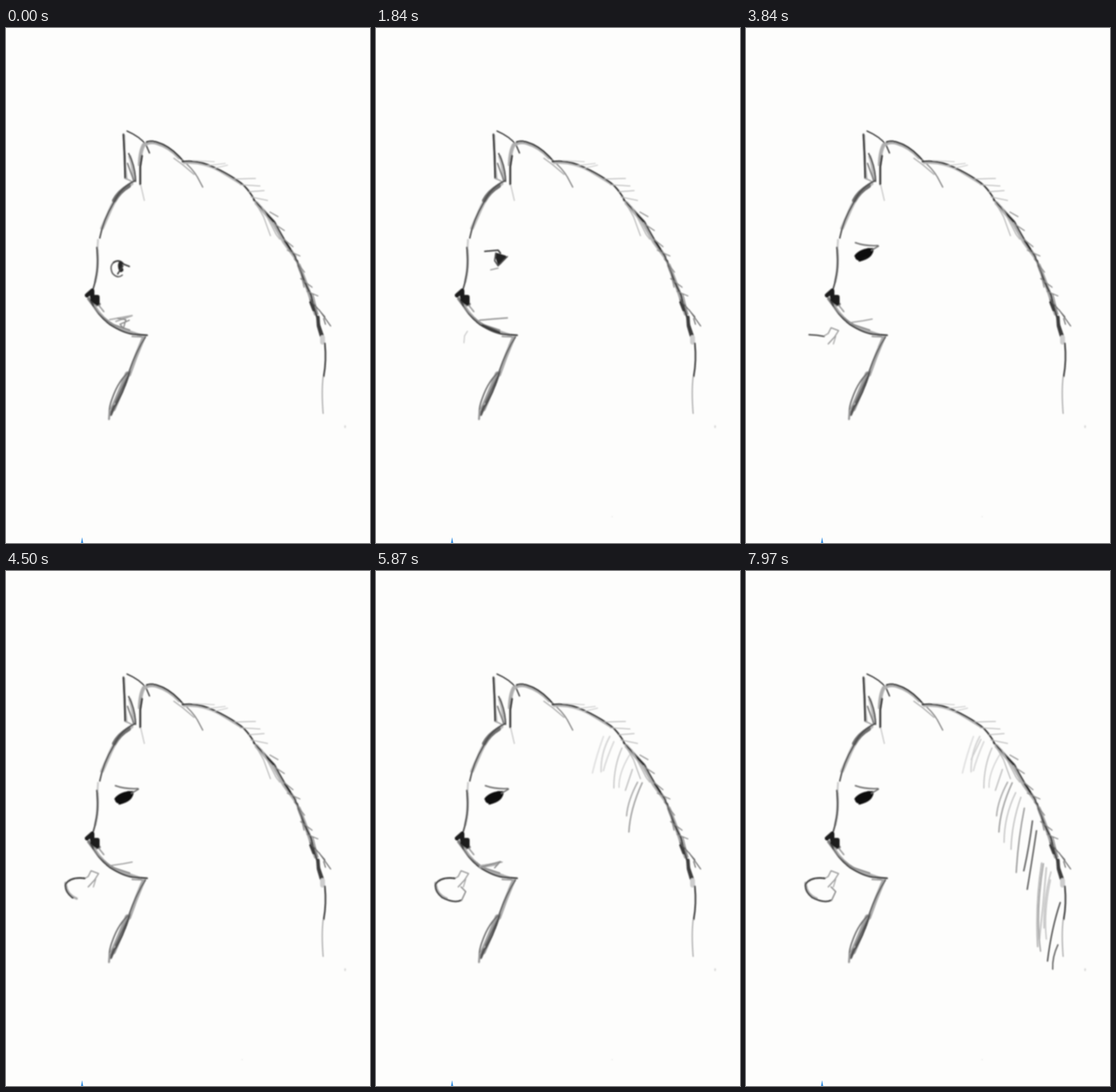
Animation of 629 by 890 pixels, one loop 8 s. Source, as an HTML page:

```html
<!DOCTYPE html>
<html lang="en">
<head>
<meta charset="utf-8">
<title>Pencil cat</title>
<style>
  html, body { margin: 0; width: 100%; height: 100%; overflow: hidden; background: #fdfdfc; }
  svg { display: block; width: 100vw; height: 100vh; }
  path { fill: none; stroke-linecap: round; stroke-linejoin: round; }
</style>
</head>
<body>
<svg viewBox="0 0 629 890">
  <defs><filter id="soft" filterUnits="userSpaceOnUse" x="0" y="0" width="629" height="890"><feGaussianBlur stdDeviation="0.85"/></filter></defs>
  <g id="art" filter="url(#soft)"></g>
  <path d="M131.5 880L129.5 890H133.5Z" style="fill: #3d93e2"/>
</svg>
<script>
const LOOP = 8000;
const BLEED = 0.5;
const art = document.getElementById('art');

// Rows: grey level, line width, path, then optionally [draw from, draw to, rub out from, rub out to] in ms.
const ears = [
  [190, 4, 'M204 186Q204 230 208 260'],
  [55, 2.8, 'M203 184L205 222L206 259'],
  [50, 1.6, 'M209 178Q232 188 242 202L248 216'],
  [185, 5, 'M214 222Q220 240 221 262'],
  [60, 1.8, 'M212 217Q223 238 224 265'],
  [120, 2, 'M210 234L221 264'],
  [175, 6, 'M238 202Q232 212 231 236'],
  [55, 2.8, 'M235 221L232 240L232 270'],
  [195, 1.3, 'M233 272L236 285L239 298'],
  [160, 1.5, 'M207 260L219 266'],
  [175, 5, 'M238 203Q247 196 260 199Q283 206 299 224'],
  [45, 2.2, 'M243 197Q250 194 260 197Q281 203 299 222L308 232'],
  [165, 1.4, 'M290 225L305 236L325 253'],
  [120, 1.4, 'M304 228Q322 242 331 258L340 275']
];

const face = [
  [185, 6, 'M217 269Q196 281 182 310L166 346'],
  [110, 7, 'M212 273Q195 283 187 298'],
  [80, 2.2, 'M223 264Q198 275 186 302Q168 332 162 363'],
  [205, 3, 'M159 366L158 382'],
  [185, 4, 'M158 384Q160 416 154 439'],
  [75, 2.2, 'M157 379Q160 410 156 428Q154 441 150 453'],
  [130, 5, 'M143 468L152 480L161 477'],
  [28, 7, 'M140 462L149 454L149 465L158 465L158 476L149 470'],
  [150, 2, 'M161 480L169 490'],
  [175, 4.5, 'M153 481Q169 507 194 518L232 531'],
  [65, 2.3, 'M147 473Q158 496 179 512Q203 527 219 529L244 531'],
  [130, 1.4, 'M151 482Q167 502 187 513L214 522'],
  [150, 2, 'M218 533L240 534']
];

const neck = [
  [170, 6, 'M237 537Q224 567 213 599'],
  [95, 2, 'M241 534Q225 558 213 593L206 618'],
  [160, 9, 'M210 598Q199 626 185 658'],
  [70, 2.4, 'M214 593Q204 630 180 668'],
  [110, 2, 'M214 593Q195 608 184 639Q176 660 180 668'],
  [90, 1.6, 'M211 600L189 647'],
  [85, 4.5, 'M187 654L181 668'],
  [150, 3, 'M179 662L178 676']
];

const back = [
  [185, 4, 'M308 233Q339 230 370 247L406 269'],
  [55, 2.4, 'M305 231Q331 227 360 241Q394 257 412 273Q424 286 430 299'],
  [180, 6, 'M433 303L459 332L480 369L499 395'],
  [65, 2.3, 'M428 297Q448 318 464 335Q480 366 499 394Q510 423 520 449'],
  [165, 6, 'M506 410L516 436L525 461L535 494'],
  [60, 2.6, 'M503 402Q514 438 527 461Q534 493 548 532'],
  [60, 5.5, 'M527 474L532 487M539 500L540 515L545 532'],
  [45, 3.4, 'M451 322L462 334M482 368L491 382'],
  [205, 8, 'M547 535L547 543'],
  [65, 2.4, 'M551 545Q554 575 549 602'],
  [170, 1.6, 'M548 603Q545 628 548 666']
];

const tufts = [
  [200, 1.1, 'M323 229L360 231M346 238L379 234M358 243L383 237'],
  [180, 1.2, 'M394 261L431 260M405 271L439 273M420 283L446 281M423 292L452 298'],
  [175, 1.2, 'M430 300L445 326L457 359M442 309L467 357L473 365'],
  [135, 1.2, 'M456 318L470 326M466 340L481 350M480 365L496 378M486 384L508 394M498 399L516 422'],
  [130, 1.2, 'M507 413L515 448M509 433L529 448M520 455L539 463M530 459L539 495'],
  [100, 1.3, 'M525 469L551 499M541 487L561 515M549 502L552 512']
];

const eyes = [
  [85, 1.8, 'M190 403Q177 409 184 424Q193 434 201 427', [0, 0, 180, 520]],
  [65, 2.4, 'M186 405Q196 399 203 408L213 412', [0, 0, 310, 640]],
  [40, 7, 'M198 407Q196 412 199 418', [0, 0, 440, 720]],
  [65, 2, 'M202 411L193 425', [0, 0, 500, 760]],

  [55, 2.2, 'M188 386L211 384L215 389', [840, 1030, 1880, 2030]],
  [35, 6, 'M209 392L222 396L213 406L210 397L218 397', [1050, 1450, 1930, 2180]],
  [75, 1.8, 'M207 389L205 402L211 411L227 395', [1300, 1590, 1980, 2210]],
  [155, 1.4, 'M198 418L211 415', [1600, 1680, 2080, 2200]],

  [75, 2, 'M191 376Q211 382 230 382', [2220, 2360, 2800, 2960]],
  [50, 9, 'M194 395L218 388L200 402L216 394', [2360, 2620, 2890, 3100]],
  [65, 2, 'M188 393L211 388L229 386L211 402L191 406', [2460, 2680, 2940, 3110]],

  [115, 2, 'M189 371Q205 377 228 376', [3100, 3240]],
  [10, 13, 'M195 395L212 387', [3270, 3530]],
  [15, 3, 'M189 394Q198 382 219 382Q218 397 196 402', [3340, 3620]],
  [110, 1.7, 'M217 384L229 377', [3610, 3700]]
];

const mouth = [
  [170, 2, 'M179 504L218 497L190 507', [0, 0, 700, 1060]],
  [135, 1.6, 'M193 502L207 504L203 519L197 512L213 505', [0, 0, 780, 1120]],
  [150, 2, 'M179 505L201 503L227 501', [1390, 1550, 2230, 2480]],
  [60, 3.6, 'M184 514L213 526', [1600, 1780, 2360, 2520]],
  [200, 3, 'M196 506L222 506', [2520, 2650, 2980, 3100]],
  [155, 1.7, 'M181 509L202 506L218 503', [3180, 3370, 7000, 7360]],
  [175, 5, 'M181 511L209 506', [4630, 4820, 6980, 7340]],
  [135, 1.6, 'M181 512L215 502L205 513', [4760, 5000, 7060, 7480]]
];

const paw = [
  [200, 1.4, 'M158 524L153 532L152 544', [1700, 1830, 3340, 3460]],
  [75, 2, 'M109 530L123 531L135 533', [3460, 3610, 3930, 4080]],
  [150, 1.5, 'M135 532L142 528L147 518L160 523L153 534L142 546', [3590, 3830]],
  [165, 1.4, 'M155 533L151 546', [3770, 3830]],
  [175, 4, 'M103 539Q104 559 122 566', [4220, 4480]],
  [65, 2.4, 'M136 531Q112 528 103 541Q101 553 114 564Q135 575 147 569', [4150, 4680]],
  [135, 1.7, 'M147 546L155 554L148 569', [4650, 4830]]
];

const mane = [
  [222, 2, 'M393 286Q381 319 374 349'],
  [212, 2.2, 'M404 286Q388 315 389 347'],
  [215, 2, 'M411 295Q398 325 393 345'],
  [195, 1.6, 'M425 306Q411 337 411 375'],
  [210, 1.6, 'M438 318Q419 350 420 374'],
  [190, 1.8, 'M443 343L431 379'],
  [165, 1.8, 'M452 365Q435 397 433 423'],
  [155, 1.9, 'M460 366Q439 412 437 451'],
  [195, 1.7, 'M466 383Q446 424 446 469'],
  [190, 1.7, 'M475 391Q459 437 458 481'],
  [150, 1.9, 'M481 410Q470 465 467 521'],
  [95, 2.1, 'M495 432Q489 479 480 518'],
  [90, 2, 'M502 449Q494 502 486 550'],
  [185, 2.4, 'M511 505Q500 574 504 649'],
  [200, 2.4, 'M519 513L513 580L507 636'],
  [195, 1.8, 'M526 534Q514 590 519 636'],
  [75, 1.9, 'M543 573Q528 617 521 674'],
  [90, 1.8, 'M539 646Q529 667 530 688']
].map((row, i) => [...row, [5250 + i * 78, 5320 + i * 78]]);

const finish = [
  [165, 1.8, 'M514 506Q500 592 509 657', [6780, 6960]],
  [195, 1.8, 'M527 520Q514 565 515 617', [7510, 7720]],
  [205, 1.6, 'M406 291L389 326', [7730, 7900]],
  [215, 2.4, 'M586 688L586 690'],
  [235, 1.5, 'M408 844L408 845', [1700, 1710]]
];

function addStroke([grey, width, d, timing]) {
  const path = document.createElementNS(art.namespaceURI, 'path');
  path.setAttribute('d', d);
  path.setAttribute('stroke', `rgb(${grey},${grey},${grey})`);
  path.setAttribute('stroke-width', width + BLEED);
  if (timing) path.setAttribute('pathLength', 1);
  art.append(path);
  return { path, timing };
}

const moving = [ears, face, neck, back, tufts, eyes, mouth, paw, mane, finish]
  .flat().map(addStroke).filter(stroke => stroke.timing);

const progress = (t, from, to) =>
  to <= from ? +(t >= from) : Math.min(1, Math.max(0, (t - from) / (to - from)));

function render(t) {
  for (const { path, timing: [from, to, rubFrom = Infinity, rubTo = Infinity] } of moving) {
    const end = progress(t, from, to);
    const start = rubFrom < LOOP ? progress(t, rubFrom, rubTo) : 0;
    const shown = end - start;
    path.style.visibility = shown > 0 ? 'visible' : 'hidden';
    path.style.strokeDasharray = `${Math.max(0, shown)} 2`;
    path.style.strokeDashoffset = -start;
  }
}

const began = performance.now();
function frame() {
  render((performance.now() - began) % LOOP);
  requestAnimationFrame(frame);
}
frame();
</script>
</body>
</html>
```
